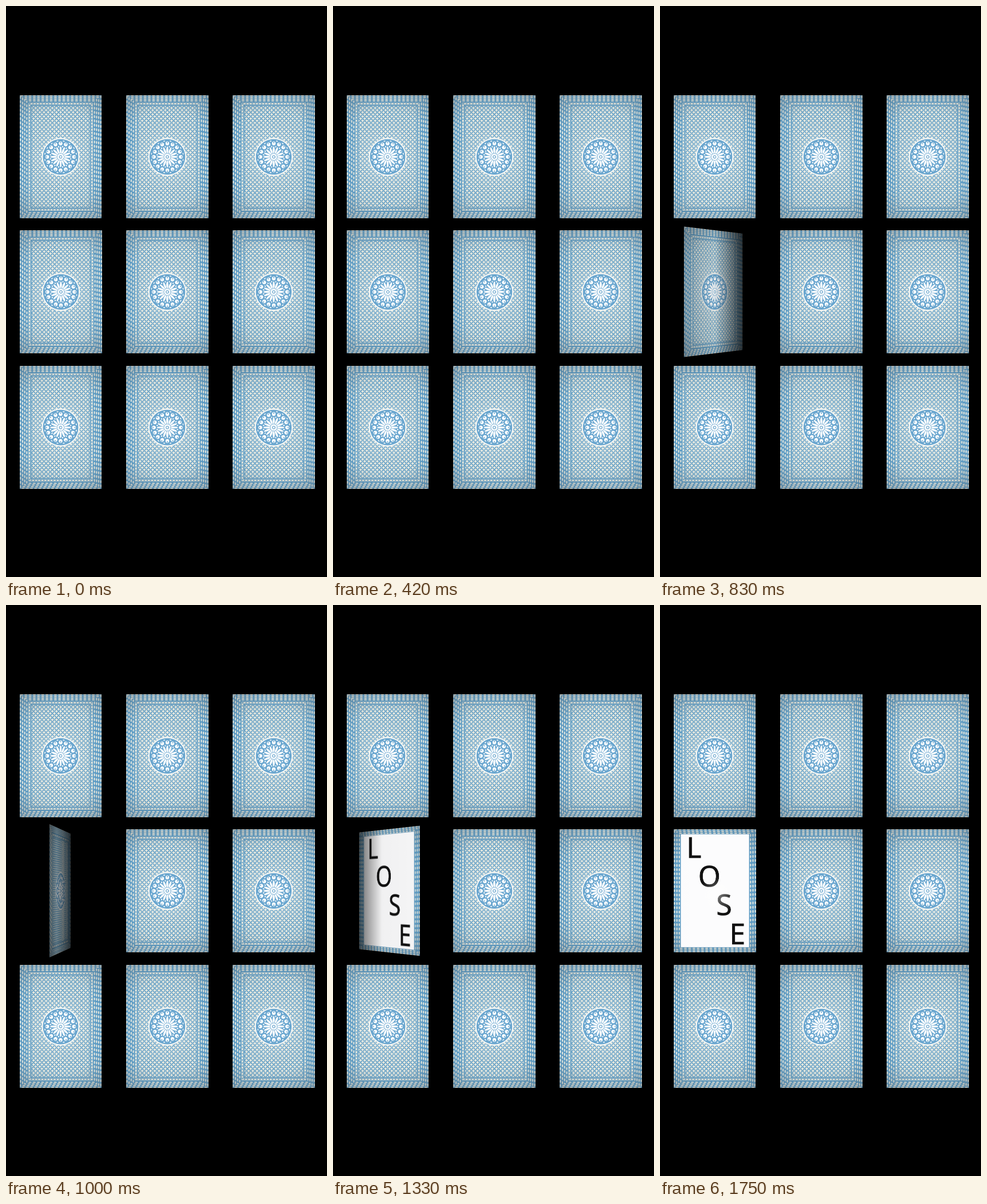
An HTML page with a canvas that plays this animation: 561 px wide and 998 px high, repeating every 1790 ms.

```html
<!DOCTYPE html>
<html lang="en">
<head>
<meta charset="utf-8">
<title>Card flip</title>
<style>
  html, body { margin: 0; width: 100%; height: 100%; overflow: hidden; background: #000; }
  .card { position: absolute; width: 143.5px; height: 215px; }
  .card > * { position: absolute; inset: 0; width: 100%; height: 100%; }
</style>
</head>
<body>
<script>
const W = 143.5, H = 215, BLUE = '#5599c6', CREAM = '#e9ece3';
const LOOP = 1790, FRAME = 1000 / 24, LAST = 42;

function makeFace(draw) {
  const canvas = document.createElement('canvas');
  canvas.width = W * 2;
  canvas.height = H * 2;
  const c = canvas.getContext('2d');
  c.scale(2, 2);
  c.fillStyle = BLUE;
  c.fillRect(0, 0, W, H);
  draw(c);
  return canvas;
}

function disc(c, x, y, rx, ry, color, turn = 0) {
  c.fillStyle = color;
  c.beginPath();
  c.ellipse(x, y, rx, ry, turn, 0, 7);
  c.fill();
}

function frame(c, x, y, width, color, dash = [], shift = 0) {
  c.strokeStyle = color;
  c.lineWidth = width;
  c.setLineDash(dash);
  c.lineDashOffset = shift;
  c.strokeRect(x, y, W - 2 * x, H - 2 * y);
}

// Staggered rows of light lozenges running around the card
function border(c, rows, stepX, stepY) {
  c.lineCap = 'round';
  for (let i = 0; i < rows; i++) {
    const x = 1.3 + i * stepX, y = 1 + i * stepY;
    frame(c, x, y, 1.5, CREAM, [4, 3.4], i * 3.7);
    frame(c, x, y, 2.3, CREAM, [1.2, 6.2], i * 3.7 - 1.4);
  }
  c.lineCap = 'butt';
}

function vignette(c, edge) {
  const g = c.createRadialGradient(W / 2, H / 2, 25, W / 2, H / 2, 130);
  g.addColorStop(0, 'rgba(255,255,255,.2)');
  g.addColorStop(.5, 'rgba(150,160,160,.06)');
  g.addColorStop(1, `rgba(80,92,100,${edge})`);
  c.fillStyle = g;
  c.fillRect(0, 0, W, H);
}

function medallion(c) {
  const ring = (n, r, rx, ry, color, phase = 0) => {
    for (let i = 0; i < n; i++) {
      const a = (i + phase) / n * Math.PI * 2;
      disc(c, r * Math.cos(a), r * Math.sin(a), rx, ry, color, a);
    }
  };
  c.save();
  c.translate(71.7, 107.7);
  disc(c, 0, 0, 33, 33, '#f6f8f6');
  disc(c, 0, 0, 31, 31, '#4a94c6');
  ring(16, 28, .8, 1.7, '#fff', .5);
  ring(16, 23.5, 3.4, 3.2, '#fff');
  ring(16, 25, 1.2, 1.1, BLUE);
  ring(16, 18, 1.4, 1, '#fff', .5);
  ring(16, 12, 6.2, 1.7, '#fff');
  disc(c, 0, 0, 5.5, 5.5, '#fff');
  disc(c, 0, 0, 3, 3, BLUE);
  disc(c, 0, 0, 1.6, 1.6, '#fff');
  c.restore();
}

// Each cell holds an X of four slim leaves
function lattice(c, left, top, cols, rows) {
  const px = (W - 2 * left) / cols, py = (H - 2 * top) / rows;
  c.fillStyle = CREAM;
  c.fillRect(left, top, W - 2 * left, H - 2 * top);
  for (let i = 0; i < cols * 2; i++) {
    for (let j = 0; j < rows * 2; j++) {
      const turn = (i + j) % 2 ? -Math.PI / 4 : Math.PI / 4;
      disc(c, left + (i + .5) * px / 2, top + (j + .5) * py / 2, 2.3, .8, BLUE, turn);
    }
  }
}

function drawBack(c) {
  border(c, 4, 3.7, 2.9);
  frame(c, 14.6, 12.2, 1.3, BLUE);
  frame(c, 17, 14.8, 3.2, CREAM);
  frame(c, 17, 14.8, 1.6, BLUE, [2.2, 3.2]);
  frame(c, 19.6, 17.4, 1.6, BLUE);
  lattice(c, 20.6, 18.6, 14, 24);
  medallion(c);
  vignette(c, .4);
}

function drawFront(c) {
  border(c, 3, 4.2, 3);
  vignette(c, .35);
  c.fillStyle = '#fcfcfd';
  c.fillRect(12.3, 8.7, W - 24.6, H - 17.6);
  c.fillStyle = c.strokeStyle = '#111';
  c.setLineDash([]);
  c.lineWidth = .6;
  c.font = '50px "Noto Sans", "Open Sans", sans-serif';
  [['L', 22, 50], ['O', 42.5, 100], ['S', 74, 150], ['E', 97, 201]].forEach(args => {
    c.fillText(...args);
    c.strokeText(...args);
  });
}

let flip;
for (let i = 0; i < 9; i++) {
  const card = document.createElement('div');
  card.className = 'card';
  card.style.left = 23.9 + i % 3 * 186.2 + 'px';
  card.style.top = 155.7 + Math.floor(i / 3) * 236.4 + 'px';
  card.append(makeFace(drawBack));
  document.body.append(card);
  if (i === 3) flip = card;
}
const front = makeFace(drawFront), shade = document.createElement('div');
flip.append(front, shade);

function shading(angle) {
  const isBack = angle < 90;
  const k = (isBack ? angle : 180 - angle) / 90;
  const mid = .65 * k ** 3.5;
  const stops = isBack
    ? [.75 * k * k, mid, .7 * Math.min(1, k * 4)]
    : [.8 * Math.min(1, k * 1.5), mid, .5 * k ** 4];
  const at = isBack ? 80 - 60 * k : 40;
  const [a, b, d] = stops.map(v => `rgba(0,0,0,${v.toFixed(3)})`);
  const dark = `linear-gradient(90deg, ${a}, ${b} ${at}%, ${d})`;
  const glare = isBack ? 0 : Math.max(0, .45 - k);
  return `radial-gradient(circle at 76px 116px, rgba(255,255,255,${glare}), transparent 34px), ${dark}`;
}

function render(now) {
  const step = Math.min(LAST, Math.floor((now % LOOP + 3.4) / FRAME));
  const u = Math.min(1, Math.max(0, (step * FRAME - 377) / 1400));
  const angle = 180 * u * u * (3 - 2 * u);
  const isBack = angle < 90;
  flip.style.transform = `perspective(900px) rotateY(${isBack ? angle : angle - 180}deg)`;
  front.style.visibility = isBack ? 'hidden' : 'visible';
  shade.style.background = shading(angle);
}

const start = performance.now();
function tick() {
  render(performance.now() - start);
  requestAnimationFrame(tick);
}
tick();
</script>
</body>
</html>
```
